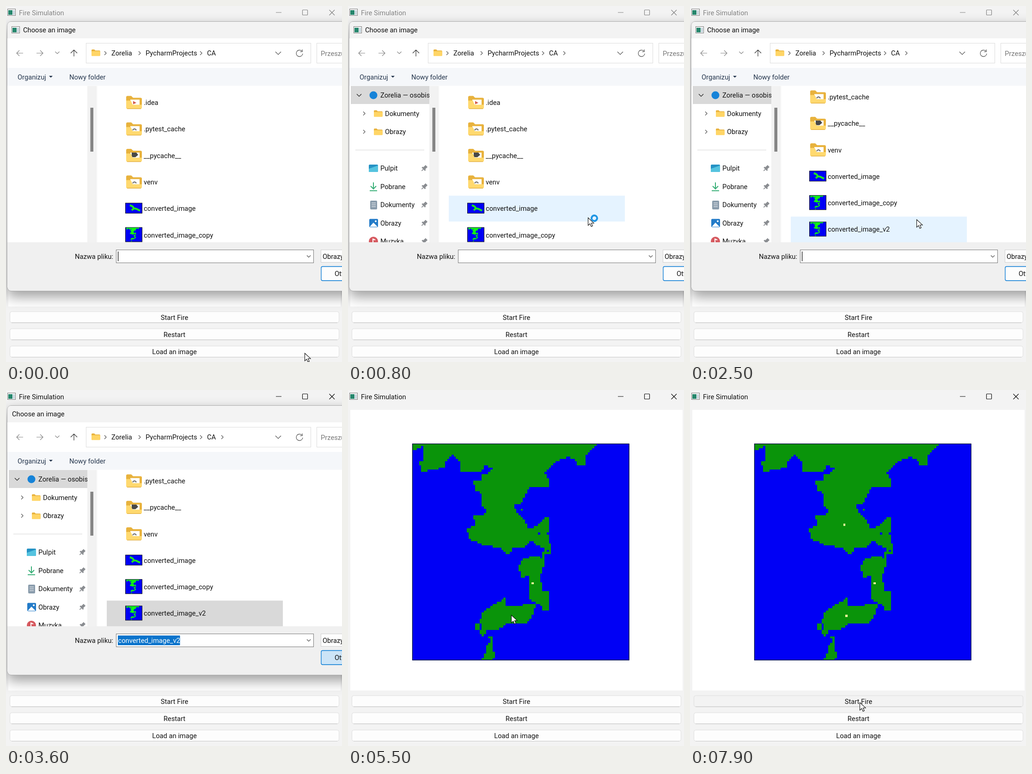
These frames come from a looping animation (727 px wide and 770 px high, 8000 ms). An HTML page:

```html
<!DOCTYPE html>
<html lang="en">
<head>
<meta charset="utf-8">
<title>Fire Simulation</title>
<style>
html, body { margin: 0; width: 100%; height: 100%; overflow: hidden; background: #f3f3f3; }
svg { display: block; }
text { font: 14.7px Roboto, "Open Sans", sans-serif; fill: #111; white-space: pre; }
.line { fill: none; stroke-width: 1.2; }
</style>
</head>
<body>
<svg id="stage" width="727" height="770" viewBox="0 0 727 770"></svg>
<script>
const LOOP = 8000;
const stage = document.getElementById('stage');

const rect = (x, y, w, h, fill, extra = '') =>
  `<rect x="${x}" y="${y}" width="${w}" height="${h}" fill="${fill}" ${extra}/>`;
const text = (x, y, s, extra = '') => `<text x="${x}" y="${y}" ${extra}>${s}</text>`;
const line = (d, color = '#444', extra = '') => `<path class="line" d="${d}" stroke="${color}" ${extra}/>`;
const group = (x, y, body, extra = '') => `<g transform="translate(${x} ${y})" ${extra}>${body}</g>`;
const chevron = (x, y, color = '#555', s = 4) => line(`M${x - s / 2} ${y - s}l${s} ${s}l${-s} ${s}`, color);
const chevronDown = (x, y, color = '#555', s = 5) => line(`M${x - s} ${y - s / 2}l${s} ${s}l${s} ${-s}`, color);

// Rough coastlines on a square grid; cells whose centre lies inside become land.
const GRID = 100;
const northCoast = [
  [0, 0], [0, 3], [2, 3], [2, 2], [5, 1], [5, 8], [3, 8], [4, 13], [15, 11], [15, 9], [18, 5], [22, 8],
  [22, 13], [32, 13], [33, 10], [37, 11], [35, 14], [32, 14], [32, 17], [28, 17], [29, 22], [32, 23],
  [32, 28], [50, 28], [54, 20], [63, 20], [63, 17], [61, 13], [66, 8], [72, 6], [76, 8], [76, 10],
  [80, 10], [80, 5], [85, 0]
];
const middleCoast = [
  [32, 28], [34, 31], [33, 33], [28, 33], [29, 38], [25, 39], [26, 44], [33, 47], [40, 48], [43, 51],
  [46, 50], [46, 48], [52, 48], [55, 44], [57, 47], [61, 48], [61, 51], [64, 51], [64, 47], [63, 45],
  [63, 34], [61, 34], [58, 38], [53, 39], [52, 35], [48, 32], [47, 28]
];
const straitCoast = [
  [51, 53], [57, 52], [60, 53], [60, 50], [61, 50], [61, 55], [59, 61], [60, 68], [63, 68], [63, 77],
  [60, 77], [60, 75], [54, 72], [54, 61], [50, 62], [49, 57]
];
const islandCoast = [
  [57, 74], [55, 80], [52, 83], [44, 83], [39, 86], [34, 86], [33, 89], [31, 88], [32, 83], [31, 83],
  [31, 86], [29, 86], [29, 83], [31, 83], [32, 78], [38, 74], [43, 71], [43, 75], [51, 75], [51, 74]
];
const southCoast = [[35, 89], [37, 89], [37, 95], [38, 98], [37, 100], [32, 100], [34, 96], [34, 93], [36, 91]];
const coasts = [northCoast, middleCoast, straitCoast, islandCoast, southCoast];
const ponds = [[58, 41], [62, 41], [62, 49]];

// Crossings of the row's centre line, paired into spans of cells.
function rowSpans(points, y) {
  const xs = [];
  points.forEach(([x0, y0], i) => {
    const [x1, y1] = points[(i + 1) % points.length];
    if (y0 > y !== y1 > y) xs.push(Math.round(x0 + (y - y0) / (y1 - y0) * (x1 - x0)));
  });
  return xs.sort((a, b) => a - b);
}
function rasterize(points) {
  let d = '';
  for (let row = 0; row < GRID; row++) {
    const xs = rowSpans(points, row + .5);
    for (let i = 0; i < xs.length; i += 2) d += `M${xs[i]} ${row}H${xs[i + 1]}v1H${xs[i]}Z`;
  }
  return `<path d="${d}"/>`;
}
const land = coasts.map(rasterize).join('');

const CELL = 4.68, MAP_X = 139.7, MAP_Y = 116.3;
const SEA = '#0000f5';
const fires = [[55, 64, 4900], [42, 79, 5900], [41, 37, 6600]];
const map = rect(139, 116, 469.5, 468.5, SEA) +
  `<g transform="translate(${MAP_X} ${MAP_Y}) scale(${CELL})" shape-rendering="crispEdges">
    <g fill="#0a940a">${land}${rect(50, 30, 1, 1, '#0a940a')}</g>` +
  ponds.map(([x, y]) => rect(x, y, 1, 1, SEA)).join('') +
  fires.map(([x, y], i) => rect(x, y, 1, 1, '#ffff9c', `id="fire${i}"`)).join('') + '</g>' +
  rect(139.5, 116.5, 468.5, 467.5, 'none', 'stroke="#001040" stroke-width="1.4"');

const appIcon = (x, y) => group(x, y,
  rect(.5, .5, 17, 14, '#fff', 'stroke="#777"') + rect(2, 3, 9, 10, '#25866c') + rect(12, 3, 4, 10, '#c4d3dc'));

const button = (y, label, id) =>
  rect(8.5, y + .5, 712, 24, '#fdfdfd', `id="${id}" rx="4" stroke="#dedede"`) +
  line(`M12 ${y + 24.5}H717`, '#c6c6c6') + text(364.5, y + 18, label, 'text-anchor="middle"');

const main = rect(0, 0, 727, 770, '#f3f3f3') + appIcon(3, 6) +
  text(28, 19.5, 'Fire Simulation', 'id="caption"') +
  `<g id="controls">${line('M584 14H596M699.5 8.5l11.5 11.5m0-11.5l-11.5 11.5', 'currentColor')}
    ${rect(641.5, 8.5, 11, 11, 'none', 'rx="1" stroke="currentColor" stroke-width="1.2"')}</g>` +
  rect(5, 43, 719, 607, '#fff') + `<g id="map">${map}</g>` +
  button(660.5, 'Start Fire', 'start') + button(697.5, 'Restart', 'restart') + button(735, 'Load an image', 'load');

const folderShape = '<path d="M0 3q0-3 3-3h8l4 4h16q3 0 3 3v16H0Z" fill="#e8b23d"/>';
const smallFolder = (x, y) => group(x, y,
  `<g transform="scale(.55)">${folderShape}${rect(0, 7, 34, 19, '#ffd566', 'rx="2"')}</g>`);
const folder = badge => folderShape + rect(9, 8, 20, 14, '#fff') + badge +
  '<path d="M0 10h10l4 9h20v6q0 3-3 3H3q-3 0-3-3Z" fill="#ffd96f"/>' + line('M2 27.6H32', '#dfaa3c');
const gear = line('M14 17q4-6 8 0', '#777', 'style="stroke-width:2.5"');
const thumb = (y, h, art) => rect(-1.5, y, 36, h, SEA, 'stroke="#111"') + art;
const coastThumb = thumb(-2, 31,
  `<g fill="#10f510" transform="translate(-1 -1.5) scale(.35 .3)">${land}</g>`);

const files = [
  ['.idea', folder('<path d="M15 11l7 4-7 3Z" fill="#d35a4b"/>')],
  ['.pytest_cache', folder(gear)],
  ['__pycache__', folder('<path d="M12 8h10l4 5-6 5h-8Z" fill="#484848"/>')],
  ['venv', folder(gear)],
  ['converted_image', thumb(2.5, 22,
    line('M8 7l6 3 3 4-5 4M17 14l5 1 8 4', '#1fe81f', 'style="stroke-width:4"'))],
  ['converted_image_copy', coastThumb],
  ['converted_image_v2', coastThumb]
];
const ROW = 57.3, rowTop = i => 181 + ROW * i;
const list = rect(218, 0, 381, 56, '#e5f3ff', 'id="hover"') +
  files.map(([name, icon], i) => group(260, rowTop(i) + 13.5, icon) + text(298, rowTop(i) + 33, name)).join('');

const pin = y => group(165, y,
  `<g transform="rotate(45)">${rect(-3, -7, 6, 8, '#8a8d91')}${rect(-5, 0, 10, 3, '#8a8d91')}${rect(-.8, 3, 1.6, 5, '#8a8d91')}</g>`);
const quickLinks = [
  ['Pulpit', rect(0, 1, 20, 16, '#2592c4', 'rx="2"') + '<path d="M0 10L20 3V15q0 2-2 2H0Z" fill="#55c3df"/>'],
  ['Pobrane', line('M10 0V13M4 8l6 6 6-6M2 18H18', '#35ad75', 'style="stroke-width:2"')],
  ['Dokumenty', rect(3, 0, 15, 19, '#8a9cac', 'rx="2"') + line('M6 5H15M6 9H15M6 13H15', '#fff')],
  ['Obrazy', rect(1, 0, 19, 18, '#237bc8', 'rx="2"') + '<path d="M2 17l8-9 9 9Z" fill="#fff"/><circle cx="15" cy="5" r="2" fill="#fff"/>'],
  ['Muzyka', '<circle cx="10" cy="9" r="10" fill="#d65a60"/>' + line('M9 13V4l5 2', '#fff', 'style="stroke-width:2"')]
];
const sidebar = rect(6, 173, 170, 39, '#d9d9d9') + chevronDown(24, 193, '#222') +
  '<circle cx="55" cy="193" r="8.5" fill="#1683d8"/>' + text(70, 198, 'Zorelia — osobiste') +
  ['Dokumenty', 'Obrazy'].map((name, i) => {
    const y = 232.5 + i * 39.5;
    return chevron(35, y) + smallFolder(56, y - 7) + text(80, y + 5, name);
  }).join('') + line('M16 311.5H165', '#d5d5d5') +
  quickLinks.map(([name, icon], i) => {
    const y = 351 + i * 39.5;
    return group(45, y - 9, icon) + text(70, y + 5, name) + pin(y);
  }).join('');

const addressBar = rect(3, 70, 724, 64, '#fff') +
  line('M37 102H23m6-6l-6 6 6 6M66 102H80m-6-6l6 6-6 6', '#888') + chevronDown(111, 101, '#888', 4.5) +
  line('M147 109V95m-7 7l7-7 7 7', '#333') +
  rect(173.5, 80.5, 486, 43, '#fff', 'stroke="#dcdcdc"') + smallFolder(185, 94) +
  chevron(215, 102) + text(228, 106.5, 'Zorelia') + chevron(289, 102) +
  text(302, 106.5, 'PycharmProjects') + chevron(422, 102) + text(435, 106.5, 'CA') +
  `<g id="lastChevron">${chevron(468, 102)}</g>` + chevronDown(589, 102, '#555', 6) +
  line('M640.5 98a7 7 0 1 0 1.5 5M641 94v5h-5', '#555') +
  rect(672.5, 80.5, 80, 43, '#fff', 'stroke="#dcdcdc"') + text(681, 107.5, 'Przeszukaj', 'style="fill:#777"');

const toolbar = rect(3, 134, 724, 38.5, '#f5f7fa') +
  text(25, 159, 'Organizuj', 'style="fill:#25364d"') + '<path d="M93 151h8l-4 4Z" fill="#25364d"/>' +
  text(137, 159, 'Nowy folder', 'style="fill:#25364d"');

const footer = rect(3, 511, 724, 98, '#f0f0f0') + text(232, 546.5, 'Nazwa pliku:', 'text-anchor="end"') +
  rect(238.5, 527.5, 427, 28, '#fff', 'stroke="#777"') + chevronDown(655, 541.5, '#555', 4) +
  `<g id="chosen">${rect(242, 531, 134.5, 21, '#0a74cc')}${text(242.5, 546.5, 'converted_image_v2', 'style="fill:#fff"')}</g>` +
  rect(242, 531, 1.2, 21, '#000', 'id="caret"') +
  rect(681.5, 527.5, 80, 27, '#fdfdfd', 'stroke="#d0d0d0"') + text(685, 546.5, 'Obrazy') +
  rect(682, 563.5, 80, 30.5, '#fdfdfd', 'id="open" rx="3" stroke="#0078d4" stroke-width="1.3"') +
  text(711, 584, 'Otwórz');

const dialog = rect(3, 33.5, 760, 583, '#f0f0f0', 'rx="8" stroke="#aaa" style="filter:drop-shadow(0 12px 14px rgba(0,0,0,.38))"') +
  '<path d="M3.5 70V42q0-8 8-8H727V70Z" fill="#f3f3f3"/>' +
  `<g id="dialogIcon">${appIcon(12, 44)}</g>` + text(37, 57, 'Choose an image', 'id="dialogTitle"') +
  rect(3, 172, 724, 339, '#fff') + `<g id="sidebar">${sidebar}</g>` +
  rect(176, 173, 20, 338, '#f2f2f2') + rect(182.5, 220, 6.5, 95, '#858585') + rect(196, 173, 2, 338, '#fafafa') +
  `<g id="list">${list}</g>` + addressBar + toolbar + footer;

const cursor = `<circle id="spinner" cx="14" cy="1" r="6" fill="none" stroke="#2096e4" stroke-width="3"/>
  <path d="M.5 0V16.5l4-3.6 2.8 6.1 2.9-1.3-2.7-6H13Z" fill="#fff" stroke="#111" stroke-width="1.1"/>`;

stage.innerHTML = main + `<g id="dialog">${dialog}</g><g id="cursor">${cursor}</g>`;

const el = {};
stage.querySelectorAll('[id]').forEach(node => el[node.id] = node);
const show = (node, on) => node.setAttribute('display', on ? 'inline' : 'none');

// Pointer stops: time, x, y.
const stops = [
  [0, 646, 751], [100, 646, 751], [700, 519, 458], [1000, 519, 458], [1400, 490, 462],
  [2950, 490, 462], [3400, 735, 580], [3700, 735, 580], [4250, 358, 459], [4550, 358, 459],
  [4850, 398, 417], [5000, 398, 417], [5450, 353, 487], [5600, 353, 487], [5800, 338, 487],
  [6050, 338, 487], [6500, 333, 290], [6700, 333, 290], [7350, 367, 676], [LOOP, 367, 676]
];
function pointerAt(t) {
  const i = stops.findIndex(s => s[0] > t);
  const [t0, x0, y0] = stops[i - 1], [t1, x1, y1] = stops[i];
  const u = (t - t0) / (t1 - t0), k = u * u * (3 - 2 * u);
  return [x0 + (x1 - x0) * k, y0 + (y1 - y0) * k];
}

function draw(t) {
  const [x, y] = pointerAt(t);
  const dialogOpen = t < 3700, closing = t >= 3550, picked = t >= 2900, listed = t >= 300;
  const scroll = t >= 1500 ? 69.3 : 0;

  show(el.dialog, dialogOpen);
  show(el.map, t >= 3900);
  show(el.sidebar, listed);
  show(el.lastChevron, listed);
  show(el.dialogIcon, !closing);
  el.dialogTitle.setAttribute('x', closing ? 13 : 37);
  el.caption.style.fill = closing ? '#111' : '#858585';
  el.controls.style.color = closing ? '#111' : '#858585';

  const inList = x > 218 && x < 599 && y > 173 && y < 511;
  const row = picked ? 6 : Math.floor((y + scroll - rowTop(0)) / ROW);
  el.list.setAttribute('transform', `translate(0 ${-scroll})`);
  show(el.hover, picked || inList);
  el.hover.setAttribute('y', rowTop(row));
  el.hover.setAttribute('fill', picked ? '#d9d9d9' : '#e5f3ff');
  show(el.chosen, picked);
  show(el.caret, !picked && t % 1060 < 530);
  el.open.setAttribute('fill', x > 682 && y > 563 && y < 595 ? '#cce4f7' : '#fdfdfd');

  fires.forEach(([, , start], i) => show(el['fire' + i], t >= start));
  el.start.setAttribute('fill', !dialogOpen && y > 661 && y < 685 ? '#f3f3f3' : '#fdfdfd');

  el.cursor.setAttribute('transform', `translate(${x} ${y})`);
  const busy = t >= 3700 && t < 4550;
  show(el.spinner, busy || (t >= 500 && t < 1100));
  el.spinner.setAttribute('stroke', busy ? '#35a6c4' : '#2096e4');
  el.spinner.setAttribute('stroke-width', busy ? 2.5 : 4);
  el.spinner.setAttribute('stroke-dasharray', busy ? '31 6.7' : 'none');
  el.spinner.setAttribute('transform', `rotate(${t * .36 % 360} 14 1)`);
}

const begin = performance.now();
function tick() {
  draw((performance.now() - begin) % LOOP);
  requestAnimationFrame(tick);
}
tick();
</script>
</body>
</html>
```
